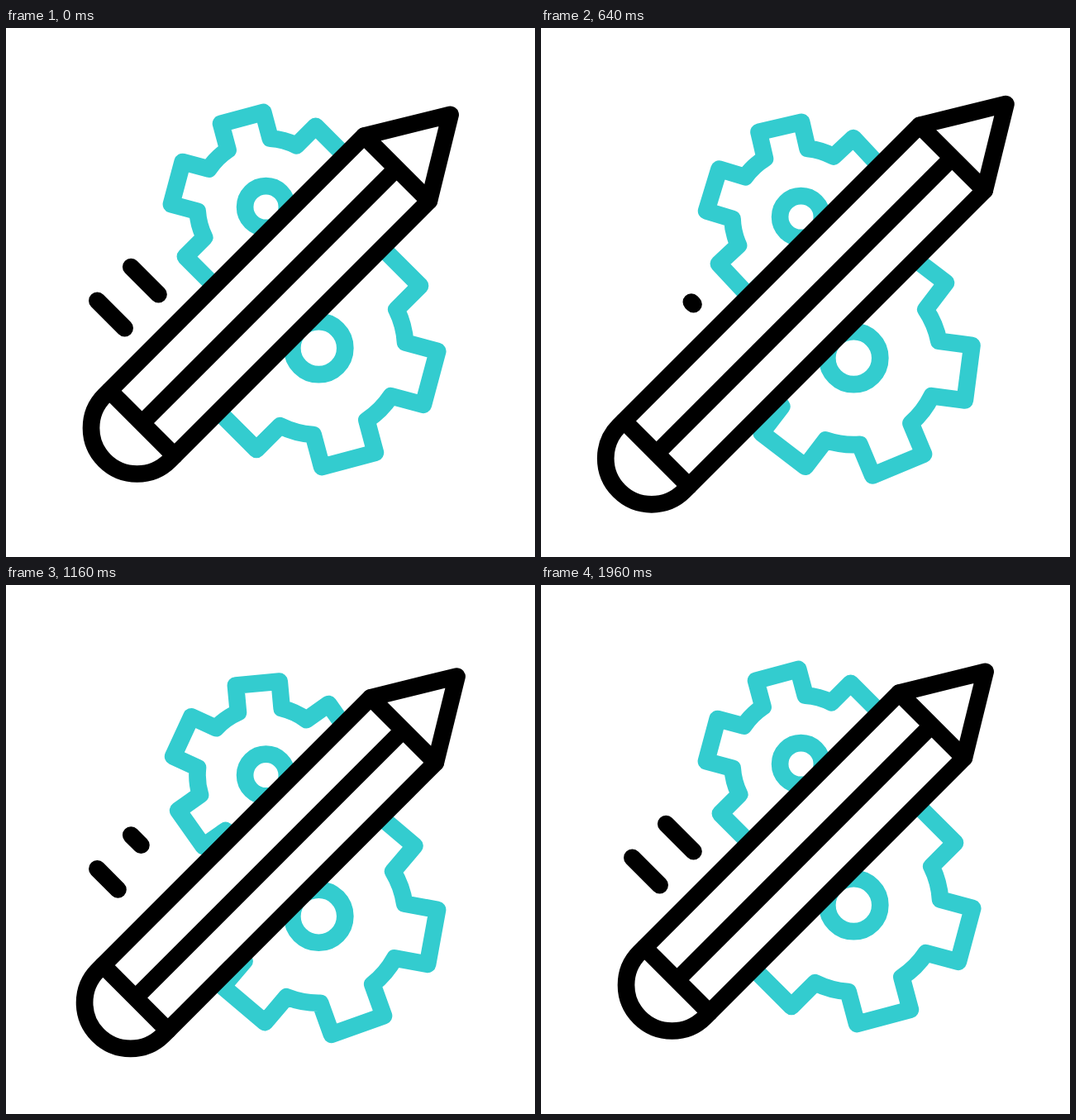
Write an HTML page that moves like this. It is 640 px wide and 640 px high and loops after 2000 ms.

```html
<!DOCTYPE html>
<html lang="en">
<head>
<meta charset="utf-8">
<title>Pencil and gears</title>
<style>
  html, body { margin: 0; width: 100%; height: 100%; overflow: hidden; background: #fff; }
  svg { display: block; width: 100vw; height: 100vh; }
  path, circle { fill: none; stroke-width: 20.7; stroke-linecap: round; stroke-linejoin: round; }
  .teal { stroke: #33cccf; }
  .ink { stroke: #000; }
  .body { fill: #fff; }
</style>
</head>
<body>
<svg viewBox="0 0 640 640">
  <defs>
    <clipPath id="above"><path d="M-100 -100H742.5L-100 742.5Z"/></clipPath>
    <clipPath id="below"><path d="M800 800H-157.5L800 -157.5Z"/></clipPath>
  </defs>
  <g id="scene">
    <g clip-path="url(#above)">
      <path id="small" class="teal"/>
      <circle class="teal" cx="314.5" cy="216.5" r="25.4"/>
    </g>
    <g clip-path="url(#below)">
      <path id="big" class="teal"/>
      <circle class="teal" cx="378.3" cy="387.2" r="32"/>
    </g>
    <g transform="translate(321.25 321.25) rotate(-45)">
      <path id="body" class="ink body"/>
      <path id="bands" class="ink"/>
      <path id="near" class="ink"/>
      <path id="far" class="ink"/>
    </g>
  </g>
</svg>
<script>
const LOOP = 2000, STEP = 40;
const $ = id => document.getElementById(id);

// Symmetric cubic ease with handles (c, 0) and (1 - c, 1)
function ease(x, c) {
  if (x <= 0) return 0;
  if (x >= 1) return 1;
  let lo = 0, hi = 1;
  for (let i = 0; i < 30; i++) {
    const u = (lo + hi) / 2, v = 1 - u;
    const at = 3 * c * u * v * v + 3 * (1 - c) * u * u * v + u * u * u;
    if (at < x) lo = u; else hi = u;
  }
  return lo * lo * (3 - 2 * lo);
}
const ramp = (t, from, to, c = 0.48) => ease((t - from) / (to - from), c);
const pulse = (t, from, peak, leave, to) => ramp(t, from, peak) - ramp(t, leave, to);

// Six straight-sided teeth joined by arcs of the root circle
function gearPath(tip, half, root) {
  const foot = Math.sqrt(root * root - half * half);
  let d = "";
  for (let k = 0; k < 6; k++) {
    const a = k * Math.PI / 3, cos = Math.cos(a), sin = Math.sin(a);
    const at = (x, y) => `${(x * cos - y * sin).toFixed(2)} ${(x * sin + y * cos).toFixed(2)}`;
    d += k ? `A${root} ${root} 0 0 1 ` : "M";
    d += `${at(foot, -half)}L${at(tip, -half)}L${at(tip, half)}L${at(foot, half)}`;
  }
  return d + `A${root} ${root} 0 0 1 ${foot} ${-half}Z`;
}

function drawPencil(s) {
  const h = 55.6, tip = 306 + s, neck = 214 + s, band = -221.7 - s, end = -230 - s;
  $("body").setAttribute("d",
    `M${neck} ${-h}L${tip} 0L${neck} ${h}H${end}A${h} ${h} 0 0 1 ${end} ${-h}Z`);
  $("bands").setAttribute("d",
    `M${neck} ${-h}V${h}M${band} ${-h}V${h}M${band} 0H${neck}`);
}

// A dash wipes away towards the pencil, then grows back
function drawDash(id, x, t) {
  const top = -143, len = 47;
  const gone = ramp(t, 80, 640), back = ramp(t, 800, 1360);
  const from = gone < 1 ? gone : 0, to = gone < 1 ? 1 : back;
  $(id).setAttribute("d", to > from ? `M${x} ${top + len * from}V${top + len * to}` : "");
}

function spin(id, x, y, t) {
  const angle = 15 + 360 * ramp(t, 60, 1900, 0.52);
  $(id).setAttribute("transform", `translate(${x} ${y}) rotate(${angle})`);
}

function draw(now) {
  let t = Math.floor((now % LOOP) / STEP) * STEP;
  if (t < 80) t = 0;
  $("scene").setAttribute("transform", `translate(0 ${15.2 * pulse(t, 120, 900, 965, 1755)})`);
  spin("small", 314.5, 216.5, t);
  spin("big", 378.3, 387.2, t - 40);
  drawPencil(37 * pulse(t, 102, 755, 755, 1422));
  drawDash("far", -155.2, t);
  drawDash("near", -97.4, t - 120);
}

$("small").setAttribute("d", gearPath(111.5, 26.5, 83));
$("big").setAttribute("d", gearPath(140, 33.5, 105));

const start = performance.now();
function tick() {
  draw(performance.now() - start);
  requestAnimationFrame(tick);
}
tick();
</script>
</body>
</html>
```
